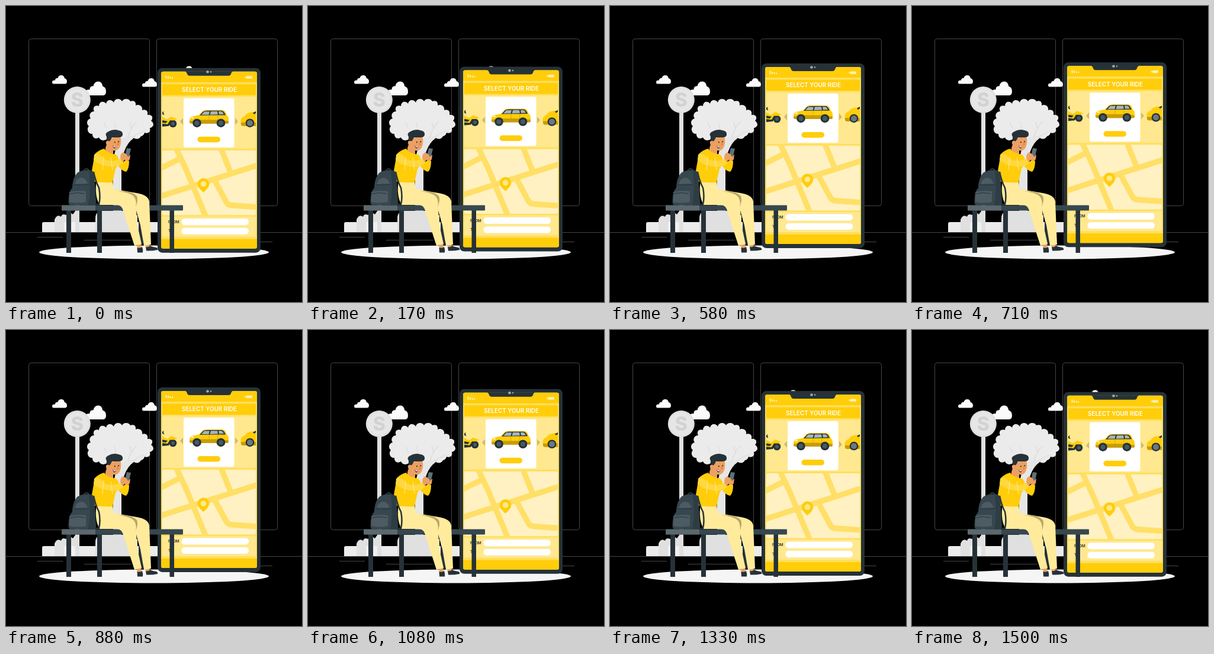
Animation of 500x500 px, one loop 1540 ms. Source, as an HTML page:

```html
<!DOCTYPE html>
<html lang="en">
<head>
<meta charset="utf-8">
<style>
  html, body { margin: 0; width: 100%; height: 100%; overflow: hidden; background: #000; }
  svg { display: block; width: 100vw; height: 100vh; }
  text { font-family: Inter, "Open Sans", sans-serif; }
  .line { fill: none; stroke: #464646; }
  .dark { fill: #263238; }
  .slate { fill: #37474f; }
  .gold { fill: #ffcd0a; }
  .skin { fill: #eda061; }
  .pants { fill: #ffeb9b; }
  .white { fill: #fff; }
</style>
</head>
<body>
<svg viewBox="0 0 500 500">
  <defs>
    <clipPath id="screen"><rect x="264" y="111" width="158" height="299"/></clipPath>
    <clipPath id="map"><rect x="264" y="244" width="158" height="109.500" rx="3"/></clipPath>
    <path id="cloud" d="M2 14.500Q0 14.500 0 11.500Q0 8 5 8.500Q5 4.500 9.500 4.800Q10.500 0 15.500 0Q20 0 20.800 5Q25 6 25 10.500Q25 14.500 21.500 14.500Z"/>
  </defs>

  <!-- Scenery -->
  <g class="line">
    <rect x="38.500" y="55.500" width="204" height="282" rx="4"/>
    <rect x="254.500" y="55.500" width="204" height="282" rx="4"/>
    <path d="M0 382.500H500M53 390.500H96M132 395.500H211M425 398.500H450"/>
  </g>
  <g fill="#fafafa">
    <use href="#cloud" x="78" y="117"/>
    <use href="#cloud" transform="translate(134.500 127.500) scale(1.380 1.620)"/>
    <use href="#cloud" x="230" y="122"/>
    <use href="#cloud" x="294" y="101.500"/>
  </g>
  <path fill="#e0e0e0" d="M117 178h7v204h-7z"/>
  <circle cx="120.300" cy="158.500" r="22.500" fill="#e0e0e0"/>
  <circle cx="120.300" cy="158.500" r="19.500" fill="#e6e6e6"/>
  <text x="120.300" y="169.500" text-anchor="middle" font-size="32" font-weight="800" fill="#d2d2d2">S</text>
  <path id="crown" fill="#ebebeb"/>
  <path fill="#e6e6e6" d="M181 382V270Q181 243 195 224L206 220L222 219Q198 231 195 270V382Z"/>
  <path fill="none" stroke="#dbdbdb" stroke-width="1.200" d="M186 211L183 196M170 207L165 197M206 222Q210 205 221 195M212 207L209 196M214 221Q228 211 237 211"/>
  <path fill="#ebebeb" d="M61 382V368Q61 365 64 365H256V382Z"/>
  <path fill="#e0e0e0" d="M82 382V361Q86 351 93 356Q95 350 101 353Q108 347 113 352L118 345H124V382ZM151 382V360Q150 349 160 346H217Q217 352 222 354V382Z"/>
  <path fill="#f0f0f0" d="M98 365H117V382H98ZM222 365H243V382H222Z"/>
  <ellipse cx="250" cy="416" rx="194" ry="11.500" fill="#f5f5f5"/>

  <!-- Large phone -->
  <g id="phone">
    <rect class="dark" x="256" y="105" width="174" height="312" rx="8"/>
    <rect x="262" y="111" width="162" height="299" rx="3.500" fill="#ffdf5c"/>
    <path class="gold" d="M262 129V114.500Q262 111 265.500 111H420.500Q424 111 424 114.500V129ZM264 132.500H422V151H264ZM262 394H424V406.500Q424 410 420.500 410H265.500Q262 410 262 406.500Z"/>
    <path class="dark" d="M302 110.500Q305 111 306 115Q307 118 310 118H376Q379 118 380 115Q381 111 384 110.500Z"/>
    <circle cx="340.500" cy="111.500" r="2.300" fill="#a6a6a6"/>
    <circle cx="346" cy="111.500" r="1.300" fill="#a6a6a6"/>
    <path fill="#fff0b5" d="M269.500 117.500h2v5.500h-2zM273 119h2v4h-2zM276.500 120h2v3h-2zM280 120.500h2v2.500h-2zM403.500 119.500h2v2.500h-2z"/>
    <rect x="406" y="118.500" width="10" height="4.500" rx="1" fill="#fff0b5"/>
    <text class="white" x="343.500" y="145.500" text-anchor="middle" font-size="9.900" font-weight="600">SELECT YOUR RIDE</text>

    <g fill="#ffe88f">
      <rect x="264" y="153.500" width="158" height="87.500" rx="2"/>
      <rect x="264" y="356" width="158" height="34" rx="2"/>
    </g>
    <rect class="white" x="300" y="156" width="85.500" height="83" rx="3"/>
    <rect class="gold" x="323.500" y="221" width="38.500" height="9.500" rx="4.750"/>
    <path fill="#ccba72" d="M299 189.500V201L294 195.200ZM387 189.500V201L392 195.200Z"/>

    <g id="car">
      <path class="gold" d="M310 193Q310 188 316 186.500L326 184.500L332 178Q334 176 339 176H365Q369 176 371 180L373 185Q376 187 376 192V197Q376 199 373 199H314Q310 199 310 196Z"/>
      <path fill="#c89c08" d="M310 194.500L330 192.500H356L376 194.500V197Q376 199 373 199H314Q310 199 310 196Z"/>
      <path class="dark" d="M327 185L333 178.500Q335 177 339 177H364Q368 177 371 184.500Z"/>
      <path fill="#a9b4b8" d="M330 184L335 178.500H344L342.500 184ZM344.500 184L346 178.300H357L358 183.500ZM360 183.500L359 178.300H363Q366 178.300 368 183Z"/>
      <path fill="none" stroke="#c89c08" stroke-width=".7" d="M343 185V194M358 185L357 194"/>
      <path class="white" d="M312 189L317 187.500L316 190.500Z"/>
      <circle class="dark" cx="322.500" cy="198" r="7.300"/><circle cx="322.500" cy="198" r="4" fill="#455a64"/>
      <circle class="dark" cx="363" cy="198" r="7.300"/><circle cx="363" cy="198" r="4" fill="#455a64"/>
    </g>
    <g clip-path="url(#screen)">
      <path class="gold" d="M396.500 194Q397 188 403 186.500Q406 181 414 179.500H424V202H400Q396.500 202 396.500 199Z"/>
      <path fill="#c89c08" d="M397 197H424V203H400Q397 203 397 199Z"/>
      <path class="dark" d="M417 181L424 177V180L419 183Z"/>
      <circle class="dark" cx="412" cy="198" r="7.300"/><circle cx="412" cy="198" r="5" fill="#6d797e"/>
      <path class="dark" d="M262 188L270 192H281L275 203L264 204ZM264 180L266.500 178L266 181L267.500 184.500L264 183Z"/>
      <circle class="dark" cx="282" cy="199" r="6.300"/><circle cx="282" cy="199" r="3" fill="#455a64"/>
      <path class="gold" d="M263 187L272 192L279 187L289.500 191L284 193.500L277 193.500L273 200L263 199Z"/>
      <path class="dark" d="M262 193L273 195L270 198L262 197Z"/>
    </g>

    <g clip-path="url(#map)">
      <path fill="#fff1c1" d="M264 244H422V354H264Z"/>
      <path fill="none" stroke="#ffdf66" stroke-width="9.500" d="M286 238L304 276L339 360M260 322L426 269M362 238L380 283M260 275L296 257M353 296L373 333Q376 337 382 337L426 340"/>
    </g>
    <path class="gold" d="M333.500 315.200Q323.700 307 323.700 301A9.800 9.800 0 0 1 343.300 301Q343.300 307 333.500 315.200Z"/>
    <circle cx="333.500" cy="301" r="4.800" fill="#ffe88f"/>
    <g class="white">
      <rect x="296.500" y="359.500" width="113.500" height="11" rx="5"/>
      <rect x="296.500" y="375" width="113.500" height="11" rx="5"/>
    </g>
    <g class="dark" font-size="6.400" font-weight="600">
      <text x="274" y="367.200">FROM</text><text x="274" y="382.700">TO</text>
    </g>
  </g>

  <!-- Bench -->
  <path class="dark" d="M102 344h8v73h-8zM154 344h8v73h-8zM224 344h7.500v61h-7.500zM276.500 344h7.500v73h-7.500z"/>
  <rect x="94" y="336.500" width="205" height="9" rx="1" fill="#37474f"/>
  <path fill="#5b686e" d="M95 336.500H151V345.500H95Q94 345.500 94 344.500V337.500Q94 336.500 95 336.500Z"/>

  <!-- Passenger -->
  <path class="skin" d="M221 400H228L229 410H222ZM235 400H242L243 408H236Z"/>
  <path class="dark" d="M221.500 408Q226 410 230 407Q232 412 231 416.500H222ZM236 407Q241 408 243 405Q247 407 254 408Q257 409 256 412Q247 414 237 413.500Z"/>
  <path class="pants" d="M180 309L221 316Q240 319 242 330L245 403L233 405L227 370L217 335L196 330Z"/>
  <path fill="#b7a76c" d="M185 313Q212 311 221 321Q224 327 219 340L210 330Z"/>
  <path class="pants" d="M153 294H180L182 312Q205 314 214 320Q221 325 219.500 339L222 370L229 402L217 405L198 346Q196 337 188 336H158Q149 320 153 294Z"/>
  <path class="skin" d="M168 240L173 224L193 220Q196 230 192 239Q188 246 181 244L181 251L168 247Z"/>
  <path class="dark" d="M173 230Q169 227 170 221Q166 215 173 212Q181 207 190 210Q198 211 197 218Q196 222 190 222L179 222Q177 227 173 230Z"/>
  <circle class="skin" cx="172" cy="231" r="3.200"/>
  <path class="dark" d="M183 229h1.600v2.200h-1.600zM189.500 228h1.600v2.200h-1.600zM180 236L186 237.500Q185 241 182 240Z"/>
  <path class="white" d="M181 236.500L185.500 237.500L184.500 239L181.500 238Z"/>
  <path fill="none" stroke="#c9783e" d="M188 230L190 234L187.500 235"/>
  <path class="gold" d="M150 250Q157 243 166 241Q169 247 181 250Q189 250 190 258L196 265L204 259L208 262Q208 275 203 280Q194 278 189 269L185 275L180 298Q162 299 145 296L144 284Z"/>
  <path fill="#ffd83f" d="M149 251Q157 247 164 257Q177 266 195 257L199 264Q190 273 177 271.500Q156 269 148 260Z"/>
  <path fill="none" stroke="#fff0b5" stroke-width=".8" d="M165 254L163 277M177 256L180 277"/>
  <path fill="#607078" d="M204 240L211 241L207 258L200 257Z"/>
  <path class="skin" d="M193 257Q193 249 198 247L204 251L206 255L210 251L209 259L206 262L200 260L197 264Z"/>

  <!-- Backpack -->
  <path fill="none" stroke="#263238" stroke-width="2.500" d="M148 280Q151 296 157 307Q160 322 157 335H150M131 279Q136 271 141 279"/>
  <path class="slate" d="M118 285Q121 278 135 277.500Q148 276 149 284L152 333Q151 336.500 146 336.500H109Q105 336 105.500 328Q106 313 112 307Q112 294 118 285Z"/>
  <path fill="#2e3c43" d="M140 278Q148 277 149 284L152 333Q151 336.500 146 336.500H139Q144 310 140 278Z"/>
  <path fill="#4d5b62" d="M116 301Q119 290 128 290Q135 291 138 300ZM107 314Q120 311 135 313V331Q120 334 107 331Z"/>
  <path fill="none" stroke="#263238" d="M114 302H140M108 317Q120 314 133 317"/>
</svg>
<script>
  const LOOP = 1540, FLOAT = 1500, STEP = 1000 / 24, RISE = 10;
  const phone = document.getElementById('phone');

  const outline = [
    [138, 210], [140, 203], [137, 196], [143, 190], [142, 182], [149, 178], [149, 170], [157, 169],
    [161, 162], [169, 165], [174, 159], [182, 163], [189, 157], [196, 161], [203, 157], [210, 161],
    [217, 161], [219, 168], [228, 169], [230, 176], [238, 177], [239, 184], [247, 187], [245, 194],
    [249, 201], [243, 206], [242, 213], [234, 214], [228, 220], [215, 222], [204, 227], [190, 225],
    [180, 227], [171, 224], [164, 227], [157, 222], [149, 223], [146, 216]
  ];
  document.getElementById('crown').setAttribute('d',
    'M146 216' + outline.map(([x, y]) => `A8 8 0 0 1 ${x} ${y}`).join('') + 'Z');

  // Linear float up and back, stepped at 24 pictures a second.
  function draw(now) {
    const time = Math.floor((now % LOOP + 5) / STEP) * STEP;
    const phase = (time + 22) / FLOAT % 1;
    const y = -RISE * (1 - Math.abs(1 - 2 * phase));
    phone.setAttribute('transform', `translate(0 ${y.toFixed(3)})`);
  }

  const start = performance.now();
  function tick() {
    draw(performance.now() - start);
    requestAnimationFrame(tick);
  }
  tick();
</script>
</body>
</html>
```
